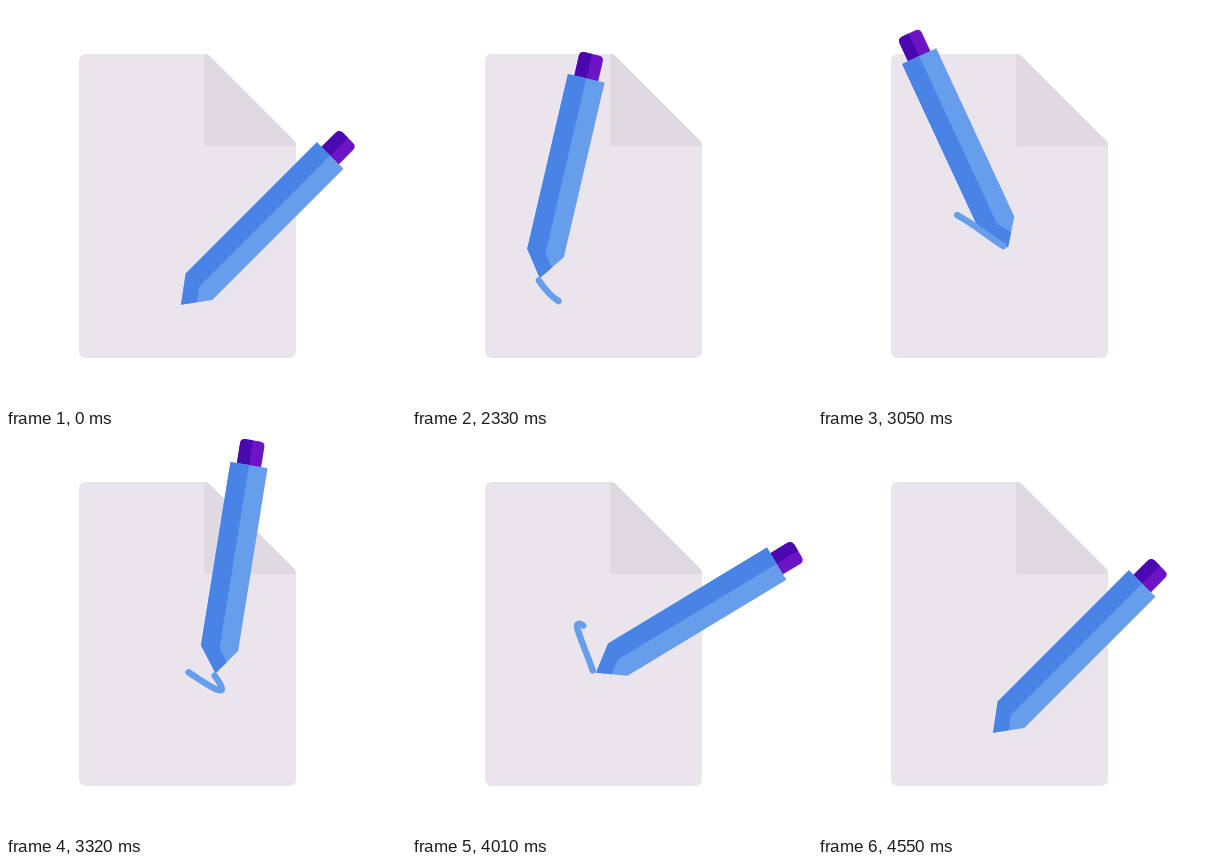
These frames come from a looping animation (400 by 400 pixels, 4580 ms). An HTML page:

```html
<!DOCTYPE html>
<html lang="en">
<head>
<meta charset="utf-8">
<title>Writing pen</title>
<style>
  html, body { margin: 0; width: 100%; height: 100%; overflow: hidden; background: #fff; }
  svg { display: block; width: 100%; height: 100%; }
</style>
</head>
<body>
<svg viewBox="0 0 400 400">
  <path fill="#eae5ec" d="M80 48H199Q202 48 204 50.5L288 134.5Q290 136.5 290 139V345Q290 352 283 352H80Q73 352 73 345V55Q73 48 80 48Z"/>
  <path fill="#dfd9e2" d="M198 48H199Q202 48 204 50.5L288 134.5Q290 136.5 290 140H201Q198 140 198 137Z"/>
  <g id="pen">
    <g id="cap">
      <path fill="#6d14c6" d="M-12.3 26V5Q-12.3 0 -7 0H7Q12.3 0 12.3 5V26Z"/>
      <path fill="#4a09ae" d="M-12.3 26V5Q-12.3 0 -7 0H0V26Z"/>
    </g>
    <path id="light" fill="#669eec"/>
    <path id="dark" fill="#4983e6"/>
  </g>
  <path id="ink" fill="none" stroke="#669eec" stroke-width="6.4" stroke-linecap="round" stroke-linejoin="round"/>
</svg>
<script>
const LOOP = 4580, START = 2030, STEP = 30;
const HALF = 18.8, NIB = 25.5, LENGTH = 236;
const $ = id => document.getElementById(id);
const ink = $("ink");

// The written curve, one piece between each pair of nodes.
const pieces = [
  "M172.5 298.7", "C150 305 134 288 120.5 264", "C108 244 101 226 103.5 206",
  "C105 192 116 194 139 209", "C156 218 172 232 187.5 241.5",
  "C200 250 232 272 206 238", "C194 222 184 205 171.5 192",
  "C168 188.5 163.5 189 165.5 195", "C169 207 176 222 181.5 238.7",
  "C188 259 186 283 172.5 298.7"
];
const nodes = pieces.map((_, i) => {
  ink.setAttribute("d", pieces.slice(0, i + 1).join(""));
  return i ? ink.getTotalLength() : 0;
});

const pose = (time, head, tail, tilt) => ({ time, head: nodes[head], tail: nodes[tail], tilt });
const poses = [
  pose(2030, 0, 0, 45),
  pose(2570, 2, 1, -18.4),
  pose(3050, 4, 3, -24.9),
  pose(3650, 6, 5, 55.7),
  pose(4010, 8, 6, 58.9),
  pose(4500, 9, 9, 45)
];

function slope(i, key) {
  const a = poses[i - 1], b = poses[i + 1];
  return a && b ? (b[key] - a[key]) / (b.time - a.time) : 0;
}

// Smooth curve through the poses.
function at(key, t) {
  const last = poses.length - 1;
  if (t <= poses[0].time) return poses[0][key];
  if (t >= poses[last].time) return poses[last][key];
  let i = 0;
  while (t >= poses[i + 1].time) i++;
  const a = poses[i], b = poses[i + 1], d = b.time - a.time, s = (t - a.time) / d, r = 1 - s;
  return a[key] + (b[key] - a[key]) * s * s * (3 - 2 * s)
    + d * s * r * (r * slope(i, key) - s * slope(i + 1, key));
}

// The pen looks shorter while it leans away near the top left.
function penLength(t) {
  const u = Math.min(1, Math.abs(t - 2620) / 400);
  return LENGTH - 34 * Math.cos(u * Math.PI / 2) ** 2;
}

const poly = pts => "M" + pts.map(p => p.join(" ")).join("L") + "Z";

function draw(ms) {
  const t = START + Math.max(0, Math.floor((ms - START) / STEP)) * STEP;
  const head = at("head", t), tail = at("tail", t), len = penLength(t), top = 25 - len;
  const p = ink.getPointAtLength(head);
  $("pen").setAttribute("transform", `translate(${p.x + 2.5} ${p.y}) rotate(${at("tilt", t)})`);
  $("cap").setAttribute("transform", `translate(0 ${-len})`);
  $("light").setAttribute("d", poly([[-HALF, top], [-HALF, -NIB], [0, 0], [HALF, -NIB], [HALF, top]]));
  $("dark").setAttribute("d", poly([[-HALF, top], [-HALF, -NIB], [0, 0], [9.5, -12.8], [0, -NIB], [0, top]]));

  const drawn = head - 3 - tail;
  ink.style.display = drawn > 0 ? "" : "none";
  ink.setAttribute("stroke-dasharray", `${Math.max(0, drawn)} 2000`);
  ink.setAttribute("stroke-dashoffset", -tail);
}

let begin;
function tick(now) {
  begin ??= now;
  draw((now - begin) % LOOP);
  requestAnimationFrame(tick);
}
draw(0);
requestAnimationFrame(tick);
</script>
</body>
</html>
```
